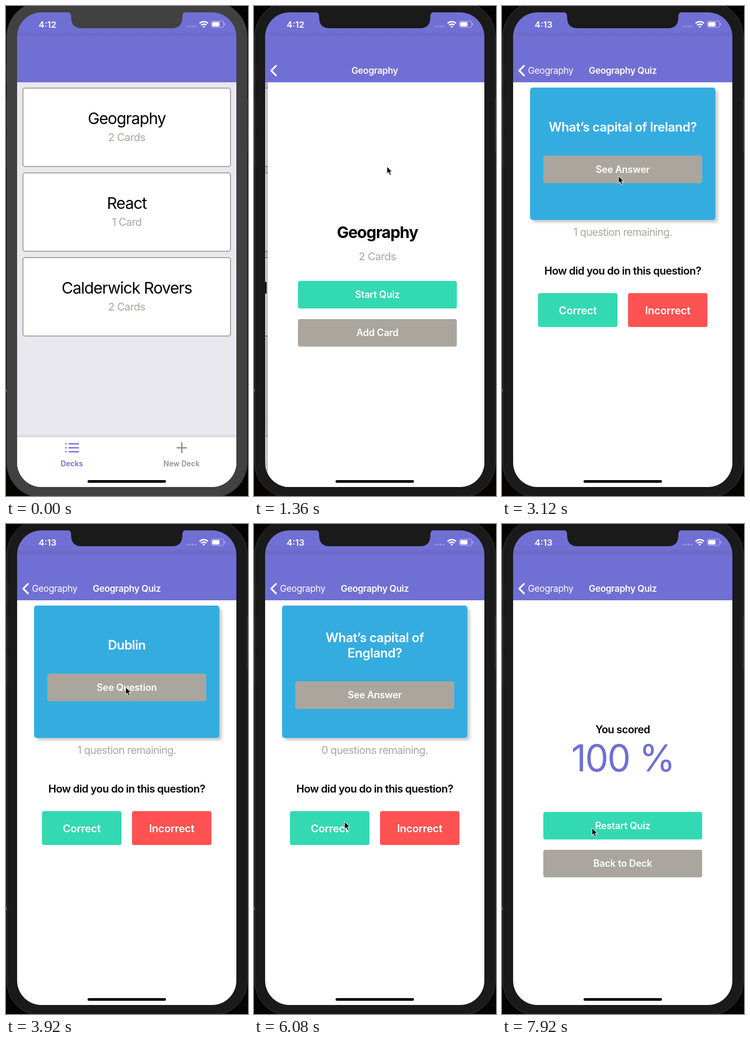
These frames come from a looping animation (457 px wide and 925 px high, 8000 ms). An HTML page:

```html
<!DOCTYPE html>
<html lang="en">
<head>
<meta charset="utf-8">
<title>Flashcards</title>
<style>
  html, body { margin: 0; width: 100%; height: 100%; overflow: hidden; background: #050403; }
  svg { display: block; width: 457px; height: 925px; }
  text { font-family: Inter, Roboto, sans-serif; font-optical-sizing: none; white-space: pre; }
</style>
</head>
<body>
<svg id="stage" viewBox="0 0 457 925" xmlns="http://www.w3.org/2000/svg"></svg>
<script>
const PURPLE = '#706fd3', TEAL = '#33d9b2', RED = '#ff5252', BLUE = '#34ace0', TAN = '#aaa69d';
const LOOP = 8000, STEP = 80, WIDTH = 414;
const TRACKING = { 17: -.018, 18: -.012, 20: -.026, 24: -.021, 30: -.036, 70: -.03 };

const text = (x, y, str, size, { weight = 400, fill = '#000', anchor = 'middle', track = TRACKING[size] || 0, id = '' } = {}) =>
  `<text id="${id}" x="${x}" y="${y}" font-size="${size}" font-weight="${weight}" fill="${fill}"
    text-anchor="${anchor}" letter-spacing="${track * size}">${str}</text>`;

const rect = (x, y, w, h, fill, extra = '') =>
  `<rect x="${x}" y="${y}" width="${w}" height="${h}" fill="${fill}" ${extra}/>`;

const button = (id, y, label, fill) => `<g id="${id}">${rect(78, y, 300, 52, fill, 'rx="4"')}
  ${text(228, y + 32.4, label, 18, { weight: 600, fill: '#fff' })}</g>`;

const answerButton = (id, x, label, fill) => `<g id="${id}">${rect(x, 542, 150, 64, fill, 'rx="4"')}
  ${text(x + 75, 581.5, label, 20, { weight: 600, fill: '#fff', track: -.012 })}</g>`;

const deckCard = (y, name, count) => rect(32, y, 392, 148, '#fff', `rx="4" stroke="${TAN}" stroke-width="2"`)
  + text(228, y + 67.5, name, 30) + text(228, y + 99.5, count, 20, { fill: TAN, track: -.024 });

const page = fill => rect(21, 144, WIDTH, 764, fill);
const edgeShadow = rect(15, 144, 6, 764, 'url(#edge)');
const dimmer = id => rect(21, 144, WIDTH, 764, '#000', `id="${id}" opacity="0"`);

const listIcon = [826.5, 834, 841.5].map(y =>
  `<circle cx="113.2" cy="${y}" r="1.4" fill="${PURPLE}"/>` + rect(118, y - 1.2, 20, 2.4, PURPLE, 'rx="1"')).join('');

const tabBar = rect(21, 808, WIDTH, 6, 'url(#tabShade)') + rect(21, 814, WIDTH, 94, '#fff') + listIcon
  + text(124.3, 868.5, 'Decks', 14, { weight: 600, fill: PURPLE })
  + '<path d="M322 834h20M332 824v20" stroke="#8e8e93" stroke-width="2.6"/>'
  + text(331.5, 868.5, 'New Deck', 14, { weight: 600, fill: '#929292' });

const decksScene = `<g id="decks">${page('#e9e8ee')}
  ${deckCard(155, 'Geography', '2 Cards')}${deckCard(315, 'React', '1 Card')}
  ${deckCard(475, 'Calderwick Rovers', '2 Cards')}${tabBar}${dimmer('decksDim')}</g>`;

const deckScene = `<g id="deck">${edgeShadow}${page('#fff')}
  ${text(228, 438, 'Geography', 30, { weight: 700, track: -.033 })}
  ${text(228, 480, '2 Cards', 20, { fill: TAN, track: -.024 })}
  ${button('start', 519, 'Start Quiz', TEAL)}${button('add', 591, 'Add Card', TAN)}${dimmer('deckDim')}</g>`;

const white24 = { weight: 600, fill: '#fff' };
const quizScene = `<g id="quiz">${edgeShadow}${page('#fff')}
  <g id="questions">
    ${rect(53, 154, 350, 250, BLUE, 'rx="5" filter="url(#drop)"')}
    <g id="prompt1">${text(228, 237, 'What’s capital of Ireland?', 24, white24)}</g>
    <g id="prompt2">${text(228, 222.5, 'What’s capital of', 24, white24)}${text(228, 251.5, 'England?', 24, white24)}</g>
    <g id="answer1">${text(228, 237, 'Dublin', 24, white24)}</g>
    <g id="flip">${button('see', 282.5, 'See Answer', TAN)}${button('back', 282.5, 'See Question', TAN)}</g>
    ${text(228, 433.5, '', 20, { fill: TAN, track: -.032, id: 'remaining' })}
    ${text(228, 507, 'How did you do in this question?', 20, { weight: 600 })}
    ${answerButton('correct', 68, 'Correct', TEAL)}${answerButton('incorrect', 238, 'Incorrect', RED)}
  </g>
  <g id="score">
    ${text(228, 395, 'You scored', 20, { weight: 600 })}
    ${text(228, 467, '100 %', 70, { fill: PURPLE })}
    ${button('restart', 543.5, 'Restart Quiz', TEAL)}${button('toDeck', 615, 'Back to Deck', TAN)}
  </g></g>`;

const head = { weight: 600, fill: '#fff' };
const header = `${rect(21, 12, WIDTH, 132, PURPLE)}${rect(21, 47, WIDTH, 9, 'url(#line)')}
  <path id="chevron" d="M41.5 113l-9 9 9 9" fill="none" stroke="#fff" stroke-width="3.2" stroke-linecap="round" stroke-linejoin="round"/>
  ${text(228, 128, 'Geography', 17, { ...head, id: 'deckTitle' })}
  ${text(228, 128, 'Geography Quiz', 17, { ...head, id: 'quizTitle' })}
  ${text(49, 128, 'Geography', 17, { fill: '#fff', anchor: 'start', track: -.022, id: 'backTitle' })}`;

const statusBar = text(78.3, 40.5, '4:12', 16.5, { ...head, id: 'clock' })
  + [343, 348, 353, 358].map(x => `<circle cx="${x}" cy="38.7" r="1.7" fill="#fff" opacity=".3"/>`).join('')
  + `<g fill="none" stroke="#fff" stroke-width="2.4">
    <path d="M365.5 32.8a11.5 11.5 0 0 1 16 0M368.4 36.2a7.5 7.5 0 0 1 10.2 0"/>
    <path d="M371 38.4a4 4 0 0 1 5 0l-2.5 2.6z" fill="#fff" stroke="none"/>
    <rect x="387.5" y="28.5" width="23.5" height="12" rx="3.5" stroke-width="1" opacity=".5"/></g>`
  + rect(389.3, 30.3, 14, 8.4, '#fff', 'rx="2"') + rect(412, 32.5, 1.6, 4, '#fff', 'rx=".8" opacity=".5"');

const sideButtons = [[0, 111, 35], [0, 174, 60], [0, 243, 61], [453, 174, 101]]
  .map(([x, y, h]) => rect(x, y, 4, h, '#2b2b2b', 'stroke="#111" stroke-width="1"')).join('');

const gradient = (id, vertical, alpha) =>
  `<linearGradient id="${id}" ${vertical ? 'x2="0" y2="1"' : ''}><stop stop-opacity="0"/><stop offset="1" stop-opacity="${alpha}"/></linearGradient>`;

document.getElementById('stage').innerHTML = `
  <defs>
    ${gradient('edge', false, .14)}${gradient('tabShade', true, .09)}${gradient('line', true, .07)}
    <clipPath id="screen"><rect x="21" y="12" width="${WIDTH}" height="896" rx="46"/></clipPath>
    <filter id="drop" x="-5%" y="-5%" width="115%" height="115%">
      <feDropShadow dx="5" dy="5" stdDeviation="2" flood-opacity=".18"/></filter>
  </defs>
  ${rect(0, 0, 457, 925, '#050403')}${rect(0, 723, 2, 6, '#8a5a2a')}${sideButtons}
  <rect class="bezel" x="1.5" y="-8" width="454" height="936" rx="66" stroke="#3c3c3c" stroke-width="1"/>
  <g clip-path="url(#screen)">${decksScene}${deckScene}${quizScene}${header}${statusBar}
    ${rect(154, 895, 148, 5, '#000', 'rx="2.5"')}</g>
  <path class="bezel" d="M115 11.5q8 0 8 8v2q0 20.5 20 20.5h170q20 0 20-20.5v-2q0-8 8-8z"/>
  <path id="cursor" d="M0 0v13.6l3.1-2.8 2.3 5.4 2.5-1.1-2.3-5.2h4.3z" fill="#000" stroke="#fff" stroke-width="1" stroke-linejoin="round"/>`;

const el = id => document.getElementById(id);
const clamp = v => Math.max(0, Math.min(1, v));
const show = (id, on) => el(id).setAttribute('display', on ? 'inline' : 'none');
const fade = (id, v) => el(id).setAttribute('opacity', v);
const move = (id, x, y = 0) => el(id).setAttribute('transform', `translate(${x} ${y})`);

// Quartic ease-out used by the screen pushes.
const push = (t, start, length) => 1 - (1 - clamp((t - start) / length)) ** 4;
// A tapped button dims, then recovers.
const press = (t, start) => t < start ? 1 : .3 + .7 * clamp((t - start - 80) / 240);

// time, x, y
const cursorPath = [
  [80, 386, 4], [480, 277, 224], [1040, 277, 224], [1360, 251, 303], [1440, 251, 303],
  [1680, 198, 515], [1760, 198, 515], [2080, 252, 549], [2160, 252, 549], [2240, 241, 551],
  [2480, 241, 551], [3120, 220, 321], [3280, 201, 309], [3440, 226, 308], [4640, 226, 308],
  [5040, 150, 598], [5200, 150, 598], [5600, 171, 562], [6480, 171, 562], [6960, 170, 574], [8000, 170, 574]
];

function cursorAt(t) {
  const i = Math.max(1, cursorPath.findIndex(p => p[0] >= t));
  const [t0, x0, y0] = cursorPath[i - 1], [t1, x1, y1] = cursorPath[i];
  const k = clamp((t - t0) / (t1 - t0));
  return [x0 + (x1 - x0) * k, y0 + (y1 - y0) * k];
}

function render(time) {
  const t = Math.floor(time / STEP) * STEP;
  const toDeck = push(t, 1120, 359), toQuiz = push(t, 2311, 500);
  const second = t >= 5760, flipped = t >= 3600 && t < 4560, done = t >= 7680;

  document.querySelectorAll('.bezel').forEach(b => b.setAttribute('fill', t < 1120 ? '#414141' : '#1a1a1a'));
  el('clock').textContent = t < 2240 ? '4:12' : '4:13';

  show('decks', toDeck < 1);
  show('deck', toDeck > 0 && toQuiz < 1);
  show('quiz', toQuiz > 0);
  move('decks', -.3 * WIDTH * toDeck);
  move('deck', WIDTH * (1 - toDeck) - .3 * WIDTH * toQuiz);
  move('quiz', WIDTH * (1 - toQuiz));
  fade('decksDim', .15 * toDeck);
  fade('deckDim', .155 * toQuiz);

  fade('chevron', toDeck);
  fade('deckTitle', toDeck ** 2 * (1 - toQuiz ** 2));
  fade('quizTitle', toQuiz ** 2);
  fade('backTitle', toQuiz ** 2);

  show('questions', !done);
  show('score', done);
  show('prompt1', !second && !flipped);
  show('answer1', flipped);
  show('prompt2', second);
  show('see', !flipped);
  show('back', flipped);
  move('flip', 0, second ? 14.5 : 0);
  el('remaining').textContent = second ? '0 questions remaining.' : '1 question remaining.';

  fade('start', press(t, 2240));
  fade('flip', press(t, t < 4560 ? 3600 : 4560));
  fade('correct', press(t, 5760));

  show('cursor', t >= 80);
  move('cursor', ...cursorAt(t));
}

const begin = performance.now();
function tick() {
  render((performance.now() - begin) % LOOP);
  requestAnimationFrame(tick);
}
tick();
</script>
</body>
</html>
```
